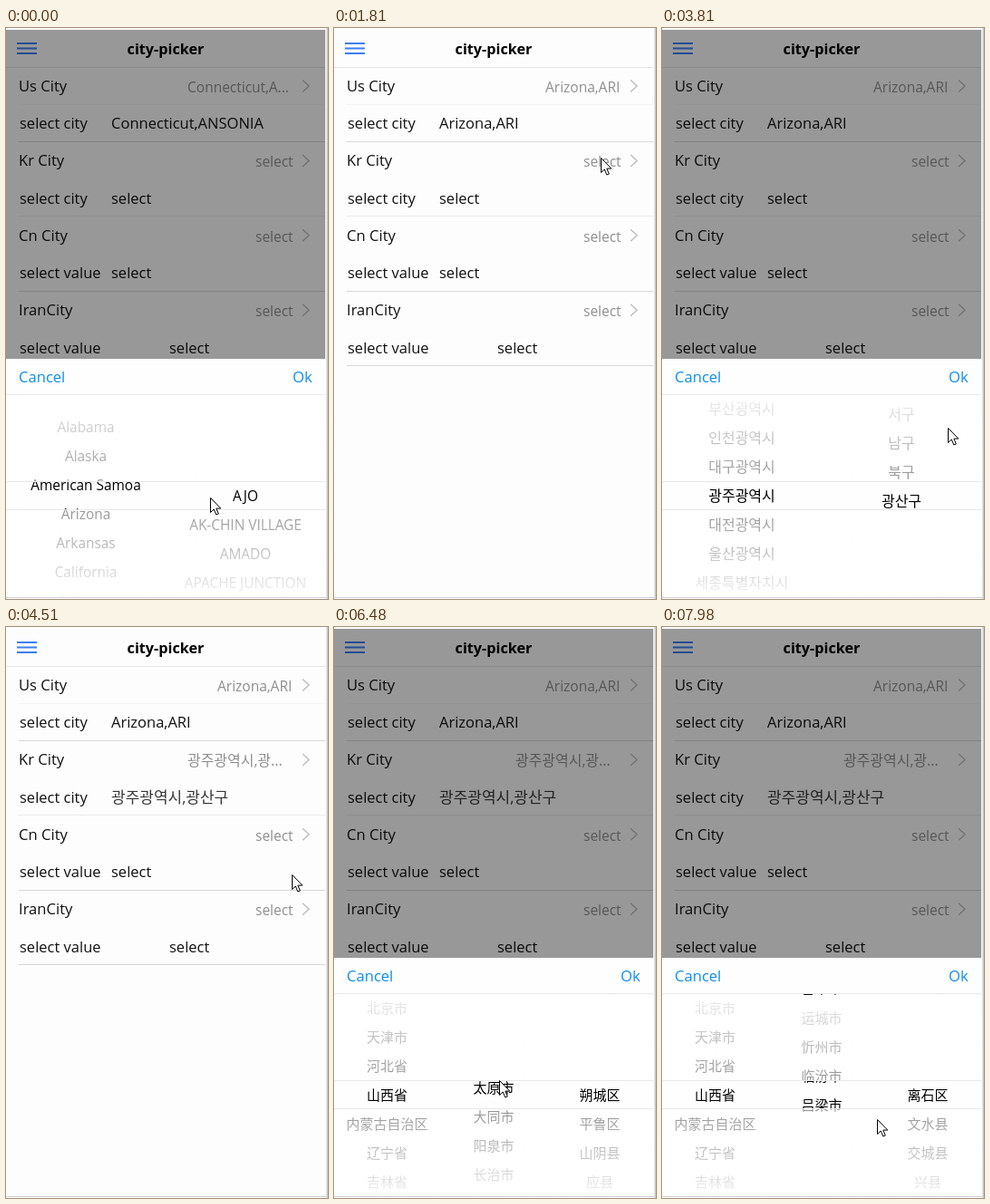
An HTML page that plays this animation: 355x630 px, repeating every 8000 ms.

```html
<!DOCTYPE html>
<html lang="en">
<head>
<meta charset="utf-8">
<title>city-picker</title>
<style>
html, body { margin: 0; width: 100%; height: 100%; overflow: hidden; background: #fff; }
svg { display: block; width: 355px; height: 630px; }
text { font-family: "Open Sans", "Noto Sans CJK SC", "Noto Sans CJK KR", "Noto Sans CJK", sans-serif; white-space: pre; }
</style>
</head>
<body>
<svg viewBox="0 0 355 630">
  <defs>
    <clipPath id="pageClip"><rect y="2" width="352" height="626"/></clipPath>
    <clipPath id="wheelClip"><rect y="404" width="352" height="224"/></clipPath>
    <linearGradient id="fade" x1="0" y1="0" x2="0" y2="1">
      <stop offset="0" stop-color="#fff" stop-opacity=".95"/>
      <stop offset="1" stop-color="#fff" stop-opacity=".58"/>
    </linearGradient>
  </defs>
  <g clip-path="url(#pageClip)">
    <rect y="2" width="352" height="626" fill="#fdfdfd"/>
    <g id="page"></g>
    <rect id="shade" y="2" width="352" height="626"/>
    <g id="panel">
      <rect y="365" width="352" height="264" fill="#fefefe"/>
      <g id="wheels" clip-path="url(#wheelClip)"></g>
      <rect y="406" width="352" height="94" fill="url(#fade)"/>
      <rect y="406" width="352" height="96" fill="url(#fade)" transform="matrix(1 0 0 -1 0 1034)"/>
      <path d="M0 404.5H352M0 500.5H352M0 531.5H352" stroke="#e8e8e8"/>
    </g>
  </g>
  <path d="M353.5 0V630" stroke="#dcdcdc"/>
  <path d="M354.5 0V630" stroke="#c4c4c4"/>
  <path d="M0 628.5H353" stroke="#cfcfcf"/>
  <path id="cursor" d="M.5 .5V16.5L4.2 13 6.8 19 9.3 18 6.8 12.1H11.8Z" fill="#fff" stroke="#000"/>
</svg>
<script>
const LOOP = 8000, STEP = 137.3, ROW = 32, CENTER = 516;
const $ = id => document.getElementById(id);

// Cursor stops: time, x, y
const stops = [
  [0, 225, 518], [275, 268, 512], [824, 324, 386], [1000, 324, 386], [1750, 294, 143],
  [2060, 294, 143], [2450, 270, 485], [2609, 270, 449], [2950, 90, 525], [3461, 265, 525],
  [3844, 315, 441], [4120, 323, 386], [4257, 323, 386], [4531, 315, 273], [4800, 298, 232],
  [5217, 298, 232], [5600, 60, 525], [6250, 183, 508], [6453, 182, 500], [7100, 184, 545],
  [7491, 186, 500], [7963, 237, 543]
];

// A list appears at its time; each flick is [start, duration, rows]
const list = (from, names, ...flicks) => ({ from, names: names.split(" | "), flicks });

const pickers = [
  { open: -1000, close: 1000, size: 15.4, columns: [
    { x: 88, lists: [list(-1000, "Alabama | Alaska | American Samoa | Arizona | Arkansas | California | Colorado | Connecticut", [-244, 600, 3])] },
    { x: 264, lists: [list(-1000, "AJO | AK-CHIN VILLAGE | AMADO | APACHE JUNCTION | ARI | ARIVACA | ARIZONA CITY | ARLINGTON", [250, 560, 4])] }
  ] },
  { open: 2000, close: 4257, size: 16, columns: [
    { x: 88, lists: [list(2000, "서울특별시 | 부산광역시 | 인천광역시 | 대구광역시 | 광주광역시 | 대전광역시 | 울산광역시 | 세종특별자치시 | 경기도", [2950, 600, 4])] },
    { x: 264, lists: [
      list(2000, "종로구 | 중구 | 용산구 | 성동구 | 광진구 | 동대문구 | 중랑구", [2470, 600, 2]),
      list(2950, "동구 | 서구 | 남구 | 북구 | 광산구", [3461, 600, 4])] }
  ] },
  { open: 5150, close: 9000, size: 15, columns: [
    { x: 58.5, lists: [list(5150, "北京市 | 天津市 | 河北省 | 山西省 | 内蒙古自治区 | 辽宁省 | 吉林省 | 黑龙江省", [5600, 600, 3])] },
    { x: 176, lists: [
      list(5150, "市辖区"),
      list(5600, "太原市 | 大同市 | 阳泉市 | 长治市 | 晋城市 | 朔州市 | 晋中市 | 运城市 | 忻州市 | 临汾市 | 吕梁市", [6441, 700, 5], [7491, 800, 5])] },
    { x: 293, lists: [
      list(5150, "东城区 | 西城区 | 朝阳区 | 丰台区 | 石景山区"),
      list(5600, "小店区 | 迎泽区 | 杏花岭区 | 尖草坪区"),
      list(6441, "朔城区 | 平鲁区 | 山阴县 | 应县 | 右玉县 | 怀仁县"),
      list(7491, "离石区 | 文水县 | 交城县 | 兴县 | 临县 | 柳林县")] }
  ] }
];

const part = (t, start, length) => Math.min(1, Math.max(0, (t - start) / length));
const easeOut = u => 1 - (1 - u) ** 3;
const smooth = u => u * u * (3 - 2 * u);
const latest = (items, t, key) => items.filter(e => e[key] <= t).pop();
const show = (el, on) => el.setAttribute("display", on ? "inline" : "none");
const shift = (el, x, y) => el.setAttribute("transform", `translate(${x} ${y})`);

function add(parent, tag, attrs = {}, text = "") {
  const el = document.createElementNS("http://www.w3.org/2000/svg", tag);
  for (const k in attrs) el.setAttribute(k, attrs[k]);
  if (text) el.textContent = text;
  return parent.appendChild(el);
}

// Text placed by its middle line
function label(parent, text, x, y, size, fill = "#000", extra = {}) {
  return add(parent, "text", { x, y: y + 6, "font-size": size, fill, ...extra }, text);
}

function line(d, stroke, width = 1) {
  return add(page, "path", { d, stroke, "stroke-width": width, fill: "none" });
}

const page = $("page"), panel = $("panel");
line("M12 17H34M12 22.5H34M12 28H34", "#3b7ff5", 1.9);
label(page, "city-picker", 176, 23, 16.2, "#000", { "font-weight": 700, "text-anchor": "middle" });
line("M0 43.5H352", "#e6e6e6");
line("M14 84.5H352", "#f4f4f4");
line("M14 207.5H352", "#ebebeb");
line("M14 125.5H352M14 290.5H352M14 372.5H352", "#d8d8d8");

// One value as shown in a row: short form and its place, full form and its place
function value(y, brief, x, full, fullX, scale = 1, fill = "#111") {
  const g = add(page, "g");
  label(g, brief, x, y + 1, 15.5 * scale, "#8f8f8f");
  label(g, full, fullX, y + 41.3, 16.5 * scale, fill);
  return g;
}

function row(index, name, hint) {
  const y = 64 + index * 82.4;
  label(page, name, 14, y, 16.6, "#111");
  label(page, hint, 15, y + 41.3, 16.5, "#111");
  line(`M327 ${y - 6.5}l7 6.5l-7 6.5`, "#bdbdbd", 1.4);
  return y;
}

const usY = row(0, "Us City", "select city");
const krY = row(1, "Kr City", "select city");
value(row(2, "Cn City", "select value"), "select", 275, "select", 116);
value(row(3, "IranCity", "select value"), "select", 275, "select", 180);

// Before and after the picker of that row is confirmed
const values = [
  [value(usY, "Connecticut,A...", 200, "Connecticut,ANSONIA", 116),
   value(usY, "Arizona,ARI", 233, "Arizona,ARI", 116)],
  [value(krY, "select", 275, "select", 116),
   value(krY, "광주광역시,광...", 200, "광주광역시,광산구", 116, 1.03, "#383838")]
];

label(panel, "Cancel", 14, 385, 16.6, "#0b8eea");
label(panel, "Ok", 316, 385, 16.6, "#0b8eea");

for (const p of pickers) {
  p.el = add($("wheels"), "g");
  for (const c of p.columns) for (const l of c.lists) {
    l.el = add(p.el, "g");
    l.names.forEach((name, i) =>
      label(l.el, name, c.x, CENTER + i * ROW, p.size, "#000", { "text-anchor": "middle" }));
  }
}

function cursorAt(t) {
  const i = stops.findIndex(s => s[0] > t);
  const b = stops.at(i), a = i > 0 ? stops[i - 1] : b;
  const u = smooth(part(t, a[0], b[0] - a[0] || 1));
  return [1, 2].map(n => a[n] + (b[n] - a[n]) * u);
}

function draw(now) {
  // The picture refreshes in even steps
  const t = Math.floor((now + 35) / STEP) * STEP;

  values.forEach(([before, after], i) => {
    show(before, t < pickers[i].close);
    show(after, t >= pickers[i].close);
  });

  const current = latest(pickers, t, "open");
  const open = smooth(part(t, current.open, 300)) - smooth(part(t, current.close, 270));
  $("shade").setAttribute("fill-opacity", .4 * open);
  shift(panel, 0, 264 * (1 - open));

  for (const p of pickers) show(p.el, p === current);
  for (const { lists } of current.columns) {
    const active = latest(lists, t, "from");
    for (const l of lists) show(l.el, l === active);
    const rows = active.flicks.reduce((sum, [start, length, n]) => sum + n * easeOut(part(t, start, length)), 0);
    shift(active.el, 0, -ROW * rows);
  }

  shift($("cursor"), ...cursorAt(t));
}

const start = performance.now();
function frame() {
  draw((performance.now() - start) % LOOP);
  requestAnimationFrame(frame);
}
frame();
</script>
</body>
</html>
```
